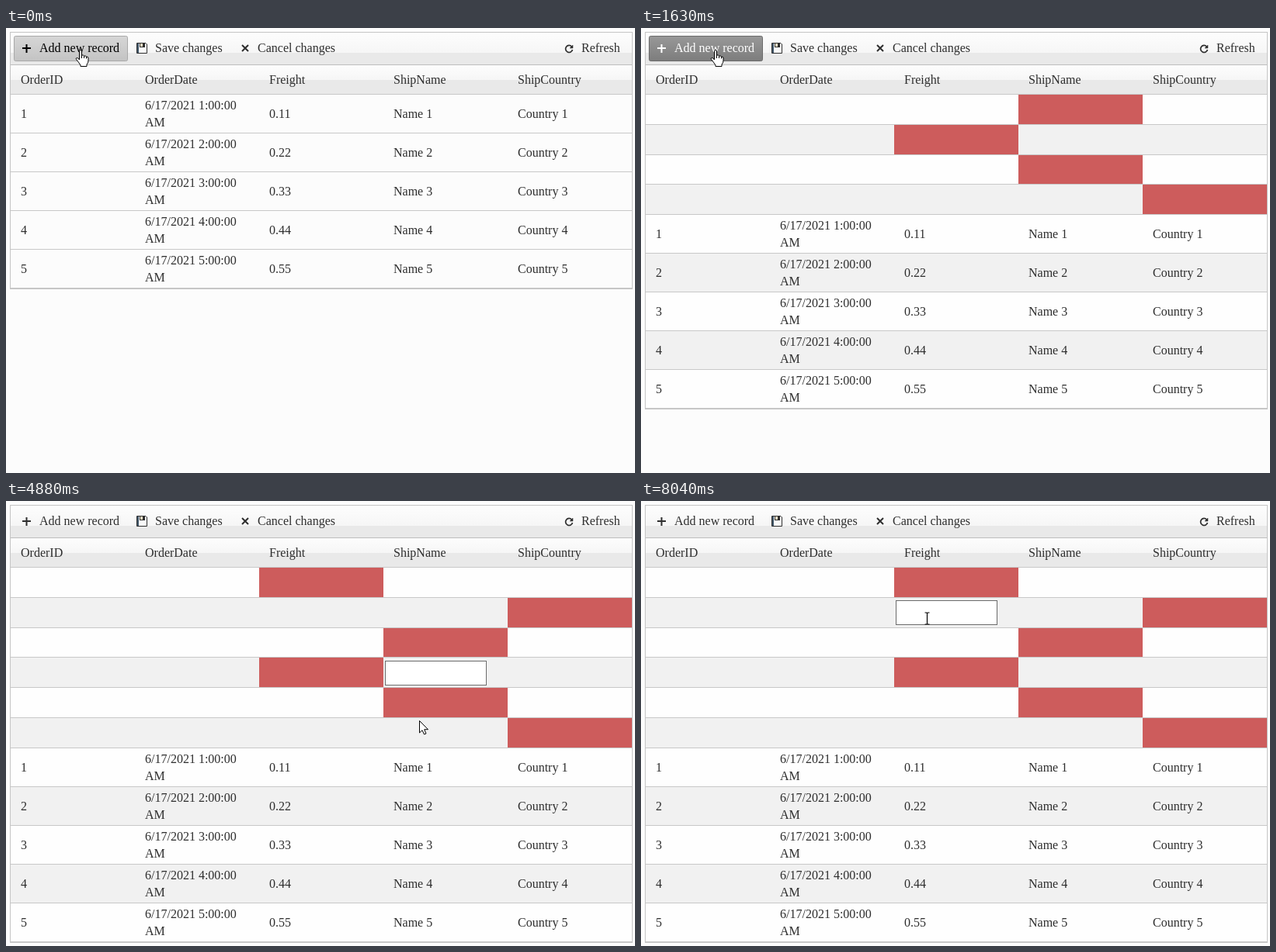
An HTML page with a canvas that plays this animation: 810x574 px, repeating every 8100 ms.

```html
<!DOCTYPE html>
<html lang="en">
<head>
<meta charset="utf-8">
<title>Batch editing grid</title>
<style>
  html, body { margin: 0; width: 100%; height: 100%; overflow: hidden; background: #fcfcfc; }
  canvas { display: block; }
</style>
</head>
<body>
<canvas id="stage" width="810" height="574"></canvas>
<script>
const ctx = document.getElementById('stage').getContext('2d');
const LOOP = 8100, TOP = 85, ROW = 38.8, COL = 160;
const INK = '#2e2e2e', LINE = '#c8c8c8', EDGE = '#c5c5c5', BLUE = '#2a70c4';
const DATE = 1, FREIGHT = 2, NAME = 3, COUNTRY = 4;
const colX = c => 6 + c * COL;
const rowY = r => Math.round(TOP + r * ROW);

// Presses on "Add new record"; each inserts a row on top, then lets go.
const presses = [60, 390, 840, 1220, 1570, 1930];
const INSERT = 120, RELEASE = 185;
const lockedCols = [COUNTRY, NAME, FREIGHT, NAME, COUNTRY, FREIGHT];

// Pointer stops; a click closes the open editor and, on a free cell, opens another.
const stop = (time, x, y, click = false) => ({ time, x, y, click });
const stops = [
  stop(2115, 97, 29), stop(2220, 137, 62), stop(2790, 208, 150),
  stop(3300, 404, 181, true), stop(4140, 526, 216, true), stop(5050, 534, 298, true),
  stop(5720, 415, 300, true), stop(6040, 421, 265, true), stop(6840, 425, 194, true),
  stop(7320, 418, 142, true), stop(7850, 334, 112), stop(8040, 368, 151)
];
const HOLD = 300, OPEN_DELAY = 110, BLINK = 530;

const hand = new Path2D('M5 1.5Q5 .5 6.5 .5Q8 .5 8 2V7Q10 6.5 11 8Q13 7.5 14 9Q16.5 8.7 16.5 11V14Q16.5 17 14.5 19V21.5H6.5V20Q4 16 1 12.5Q0 10.5 2 10.5Q3.5 10.5 5 13Z');
const knuckles = new Path2D('M8 7V11M11 8V11M14 9V11.5');
const arrow = new Path2D('M.5 .5V16L4 12.7L6.5 18L9 17L6.7 11.7H11.5Z');
const beam = new Path2D('M-3 -7.5H-1L0 -7L1 -7.5H3M0 -7V7M-3 7.5H-1L0 7L1 7.5H3');
const cross = new Path2D('M-4 -4L4 4M4 -4L-4 4');
const floppy = new Path2D('M.5 .5H12L13.5 2V13.5H.5Z');
const reload = new Path2D('M3.5 -3A4.5 4.5 0 1 0 4.5 1');
const reloadTip = new Path2D('M5 -5V-1H1Z');

function box(x, y, w, h, fill) {
  ctx.fillStyle = fill;
  ctx.fillRect(x, y, w, h);
}
function frame(x, y, w, h, color) {
  ctx.lineWidth = 1;
  ctx.strokeStyle = color;
  ctx.strokeRect(x + .5, y + .5, w - 1, h - 1);
}
function text(s, x, y, color = INK) {
  ctx.fillStyle = color;
  ctx.fillText(s, x, y);
}
function shape(p, x, y, stroke, width = 1, fill) {
  ctx.save();
  ctx.translate(x, y);
  if (fill) { ctx.fillStyle = fill; ctx.fill(p); }
  ctx.strokeStyle = stroke;
  ctx.lineWidth = width;
  ctx.stroke(p);
  ctx.restore();
}
function shade(y, h, from, to) {
  const g = ctx.createLinearGradient(0, y, 0, y + h);
  g.addColorStop(0, from);
  g.addColorStop(1, to);
  return g;
}
function glossyBar(y, h, split) {
  box(6, y, 800, split, shade(y, split, '#fdfdfd', '#f6f6f6'));
  box(6, y + split, 800, h - split, '#e9e9e9');
}

function drawButton(pressed) {
  ctx.beginPath();
  ctx.roundRect(10.5, 10.5, 146, 32, 2);
  ctx.fillStyle = pressed ? shade(11, 32, '#989898', '#7c7c7c') : shade(11, 32, '#d6d6d6', '#c3c3c3');
  ctx.fill();
  ctx.strokeStyle = pressed ? '#6c6c6c' : '#a9a9a9';
  ctx.lineWidth = 1;
  ctx.stroke();
}

function drawToolbar(hover, pressed) {
  glossyBar(6, 41, 26);
  box(6, 47, 800, 1, '#bdbdbd');
  glossyBar(48, 37, 19);
  box(6, TOP, 800, 1, LINE);

  if (hover) drawButton(pressed);
  const color = pressed ? '#fff' : hover ? '#000' : INK;
  box(21, 25, 11, 2, color);
  box(25.5, 21, 2, 11, color);
  text('Add new record', 43, 31, color);

  shape(floppy, 168, 19, INK, 1, '#fafafa');
  box(169, 20, 2, 12, '#41576a');
  box(172, 20, 7, 5, INK);
  box(173, 20, 3, 4, '#f3e3c4');
  text('Save changes', 192, 31);
  shape(cross, 308, 26, INK, 2);
  text('Cancel changes', 324, 31);
  shape(reload, 725, 27, INK, 1.7);
  shape(reloadTip, 725, 27, INK, .5, INK);
  text('Refresh', 741, 31);

  ['OrderID', 'OrderDate', 'Freight', 'ShipName', 'ShipCountry']
    .forEach((s, c) => text(s, colX(c) + 13, 72));
}

function drawRows(count) {
  for (let r = 0; r < count; r++) {
    const y = rowY(r), h = rowY(r + 1) - y;
    box(6, y + 1, 800, h, r % 2 ? '#f1f1f1' : '#fefefe');
    box(colX(lockedCols[count - 1 - r]), y + 1, COL, h, '#cd5c5c');
    box(6, y + h, 800, 1, LINE);
  }
  const start = rowY(count);
  for (let i = 1; i <= 5; i++) {
    const y = start + (i - 1) * 50;
    box(6, y + 1, 800, 49, !count ? '#fcfcfc' : (count + i) % 2 ? '#fefefe' : '#f1f1f1');
    box(6, y + 50, 800, 1, LINE);
    text(`6/17/2021 ${i}:00:00`, colX(DATE) + 13, y + 20);
    text('AM', colX(DATE) + 13, y + 42);
    [i, '', (i * 0.11).toFixed(2), 'Name ' + i, 'Country ' + i]
      .forEach((s, c) => text(s, colX(c) + 13, y + 31));
  }
  frame(5, 5, 802, start + 247, EDGE);
}

const editorBox = ({ col, row }) => [colX(col) + 2, Math.round(TOP + row * ROW + 4.3), 131, 32];

function drawEditor(cell, age, focused) {
  const [x, y, w, h] = editorBox(cell);
  const border = focused ? '#6b6b6b' : '#b8b8b8';
  box(x, y, w, h, '#fff');
  if (cell.col === DATE) {
    box(x + 98, y, 33, h, shade(y, h, '#fafafa', '#e9e9e9'));
    box(x + 98, y, 1, h, border);
    frame(x + 107, y + 10, 14, 13, BLUE);
    box(x + 107, y + 13, 14, 1, BLUE);
    box(x + 110, y + 8, 1, 3, BLUE);
    box(x + 117, y + 8, 1, 3, BLUE);
    box(x + 115, y + 17, 4, 4, INK);
  }
  frame(x, y, w, h, border);
  if (focused && age % (2 * BLINK) < BLINK) box(x + 11, y + 8, 1, 17, '#000');
}

function openEditor(t, count) {
  const last = stops.filter(s => s.click && s.time <= t).pop();
  if (!last) {
    const press = presses.filter(p => p <= t).pop();
    return t >= press + INSERT ? { col: DATE, row: 0, since: press + RELEASE } : null;
  }
  const col = Math.floor((last.x - 6) / COL), row = Math.floor((last.y - TOP) / ROW);
  const since = last.time + OPEN_DELAY;
  return t >= since && lockedCols[count - 1 - row] !== col ? { col, row, since } : null;
}

function pointerAt(t) {
  const i = stops.findIndex(s => s.time > t);
  if (i < 1) return i ? stops[stops.length - 1] : stops[0];
  const a = stops[i - 1], b = stops[i], leave = a.time + (a.click ? HOLD : 0);
  const k = Math.max(0, (t - leave) / (b.time - leave));
  const ease = k * k * (3 - 2 * k);
  return { x: Math.round(a.x + (b.x - a.x) * ease), y: Math.round(a.y + (b.y - a.y) * ease) };
}

function drawPointer({ x, y }, overButton, editor) {
  if (overButton) {
    shape(hand, x - 7.5, y - 1, '#000', 1, '#fff');
    shape(knuckles, x - 7.5, y - 1, '#000');
    return;
  }
  const [left, top, w, h] = editor ? editorBox(editor) : [0, 0, 0, 0];
  const inside = x > left && x < left + w && y > top && y < top + h;
  if (inside) shape(beam, x + .5, y + .5, '#000', 1.2);
  else shape(arrow, x, y, '#000', 1, '#fff');
}

function render(t) {
  const count = presses.filter(p => t >= p + INSERT).length;
  const pressed = presses.some(p => t >= p && t < p + RELEASE);
  const pointer = pointerAt(t), hover = pointer.y < 43;
  const editor = openEditor(t, count);
  box(0, 0, 810, 574, '#fcfcfc');
  ctx.font = '16px "Liberation Serif", "Times New Roman", serif';
  drawToolbar(hover, pressed);
  drawRows(count);
  if (editor) drawEditor(editor, t - editor.since, !pressed);
  drawPointer(pointer, hover, editor);
}

const began = performance.now();
function tick() {
  render((performance.now() - began) % LOOP);
  requestAnimationFrame(tick);
}
tick();
</script>
</body>
</html>
```
